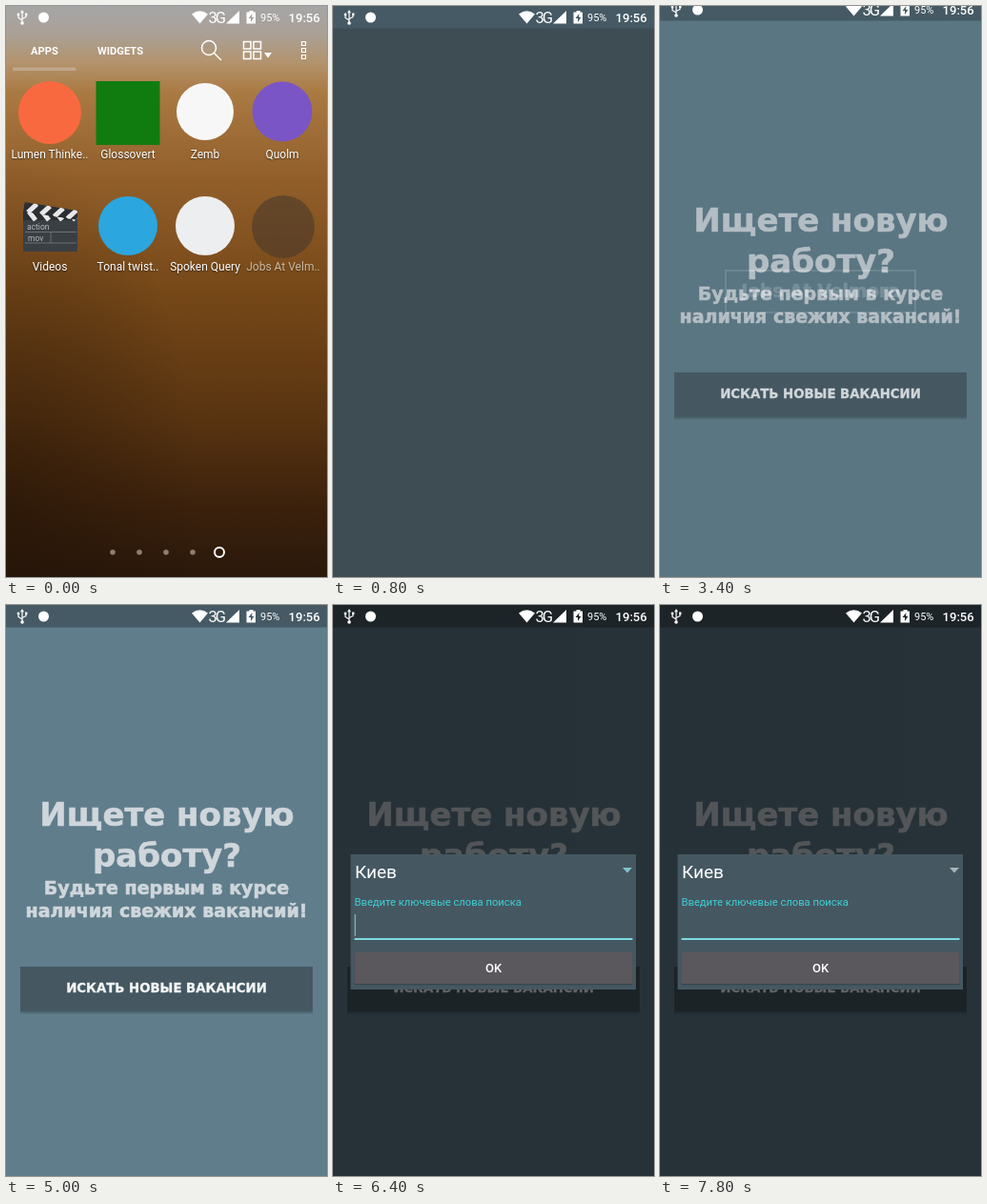
Animation, 337 px wide and 600 px high, one loop 8 s. Source, as an HTML page:

```html
<!DOCTYPE html>
<html lang="ru">
<head>
<meta charset="utf-8">
<title>Job search app</title>
<style>
  html, body { margin: 0; width: 100%; height: 100%; overflow: hidden; background: #455a64; }
  svg { display: block; width: 100vw; height: 100vh; font-family: Roboto, sans-serif; }

  /* Every state holds until the next one: hard steps on an 8 s loop. */
  .step { animation: 8s step-end infinite; }
  .mid { text-anchor: middle; }
  .bold { font-weight: 700; }
  .heavy { font-family: "DejaVu Sans", sans-serif; font-weight: 700; text-anchor: middle; stroke-width: .6; }
  .label text { font-size: 12px; fill: #fff; text-anchor: middle; text-shadow: 0 1px 2px #0009; }

  #launcher { animation-name: launcher; }
  @keyframes launcher { 0% { visibility: visible } 10%, 100% { visibility: hidden } }

  #pressed { animation-name: pressed; }
  @keyframes pressed { 0% { opacity: .6 } 2.5%, 100% { opacity: 1 } }

  #blank { animation-name: blank; }
  @keyframes blank {
    0% { opacity: 0; transform: none }
    5% { opacity: .85; transform: translateY(6px) }
    10% { opacity: 1; transform: none }
    12.5%, 100% { opacity: 0 }
  }

  #splash { animation-name: splash; }
  @keyframes splash { 0% { visibility: hidden } 12.5% { visibility: visible } 45%, 100% { visibility: hidden } }

  #logo { transform-origin: 168.5px 300px; animation-name: spin; }
  @keyframes spin {
    0% { opacity: 0 }
    15% { opacity: .4; transform: rotate(-108deg) scale(2.8) }
    17.5% { opacity: .75; transform: rotate(-43deg) scale(1.72) }
    20%, 100% { opacity: 1; transform: none }
  }

  #home { animation-name: home; }
  @keyframes home {
    0% { opacity: 0 }
    42.5% { opacity: .8; transform: translateY(5px) }
    45%, 100% { opacity: 1; transform: none }
  }

  #button { animation-name: button; }
  @keyframes button { 0% { fill: #455862 } 57.5% { fill: #485d68 } 62.5%, 100% { fill: #455862 } }

  #ripple { animation-name: ripple; }
  @keyframes ripple { 0% { opacity: 0 } 60% { opacity: .06 } 62.5%, 100% { opacity: 0 } }

  #dim { animation-name: dim; }
  @keyframes dim { 0% { opacity: 0 } 65%, 100% { opacity: .6 } }

  #dialog { animation-name: dialog; }
  @keyframes dialog { 0% { opacity: 0 } 65% { opacity: .6 } 70%, 100% { opacity: 1 } }

  #caret { animation-name: caret; }
  @keyframes caret {
    0% { opacity: 0 } 75% { opacity: 1 } 82.5% { opacity: 0 }
    92.5% { opacity: 1 } 97.5%, 100% { opacity: 0 }
  }

  #arrow { animation-name: arrow; }
  @keyframes arrow { 0% { fill: #a9b4b9 } 77.5% { fill: #7fc4cb } 82.5%, 100% { fill: #a9b4b9 } }

  #status { animation-name: status; }
  @keyframes status {
    0% { transform: none; visibility: visible }
    12.5% { visibility: hidden }
    42.5% { transform: translateY(-8px); visibility: visible }
    45%, 100% { transform: none; visibility: visible }
  }

  #bar { animation-name: bar; }
  @keyframes bar { 0% { fill: #455a6400 } 5% { fill: #455a64 } 65%, 100% { fill: #1c2428 } }
</style>
</head>
<body>
<svg viewBox="0 0 337 600" preserveAspectRatio="none">
  <defs>
    <linearGradient id="sand" x2="0" y2="1">
      <stop offset="0" stop-color="#a6a6a6"/>
      <stop offset=".05" stop-color="#aaa096"/>
      <stop offset=".1" stop-color="#b3936c"/>
      <stop offset=".15" stop-color="#aa7a43"/>
      <stop offset=".3" stop-color="#925f2a"/>
      <stop offset=".5" stop-color="#764818"/>
      <stop offset=".72" stop-color="#593411"/>
      <stop offset=".88" stop-color="#3b210c"/>
      <stop offset="1" stop-color="#2a180b"/>
    </linearGradient>
    <radialGradient id="shade" cx="0" cy=".85" r=".6">
      <stop offset="0" stop-color="#1d0f05" stop-opacity=".45"/>
      <stop offset="1" stop-color="#1d0f05" stop-opacity="0"/>
    </radialGradient>
    <clipPath id="clap"><path d="M18 206H75V216H18Z"/></clipPath>
  </defs>

  <g id="launcher" class="step">
    <path fill="url(#sand)" d="M0 0H337V600H0Z"/>
    <path fill="url(#shade)" d="M0 0H337V600H0Z"/>
    <path fill="#c4b09a" opacity=".75" d="M7 64.5H73V68H7Z"/>
    <g fill="#fff" font-size="11.2" class="bold">
      <text x="26" y="51">APPS</text>
      <text x="96" y="51">WIDGETS</text>
    </g>
    <g fill="none" stroke="#fff" stroke-width="1.5">
      <circle cx="213" cy="44" r="7.5"/>
      <path d="M218.500 49.500L226 57"/>
      <path d="M249.500 37.500h7.500v7.500h-7.500zM260 37.500h7.500v7.500h-7.500zM249.500 48h7.500v7.500h-7.500zM260 48h7.500v7.500h-7.500z"/>
      <path stroke-width="1.2" d="M310.500 37.500h4v4h-4zM310.500 44.500h4v4h-4zM310.500 51.500h4v4h-4z"/>
    </g>
    <path fill="#fff" d="M271 49h8l-4 5.500z"/>

    <circle cx="46" cy="112" r="33" fill="#f9693f"/>
    <path fill="#107c10" d="M94.500 79H161.500V146H94.500Z"/>
    <circle cx="209" cy="111" r="30" fill="#f7f7f7"/>
    <circle cx="290" cy="111" r="31.500" fill="#7a55c6"/>
    <circle cx="128" cy="231" r="31" fill="#2ba6de"/>
    <circle cx="209" cy="231" r="31" fill="#eceef0"/>

    <g>
      <path fill="#3a3f43" d="M18 225H75V258H18Z"/>
      <path fill="#2b2f32" d="M18 216H75V225H18Z"/>
      <path stroke="#e8e8e8" stroke-width="5" d="M24 216l7 9M38 216l7 9M52 216l7 9M66 216l7 9"/>
      <g transform="rotate(9 18 216)" clip-path="url(#clap)">
        <path fill="#2b2f32" d="M18 206H75V216H18Z"/>
        <path stroke="#e8e8e8" stroke-width="5" d="M31 206l-8 10M45 206l-8 10M59 206l-8 10M73 206l-8 10"/>
      </g>
      <path stroke="#777d80" stroke-width=".8" d="M20 237.500H74M20 249H74M47 238V249"/>
      <g fill="#b4b8ba" font-size="8.500">
        <text x="22" y="235">action</text>
        <text x="23" y="247">mov</text>
      </g>
    </g>

    <g class="label">
      <text x="46" y="160">Lumen Thinke..</text>
      <text x="128" y="160">Glossovert</text>
      <text x="209" y="160">Zemb</text>
      <text x="290" y="160">Quolm</text>
      <text x="46" y="278">Videos</text>
      <text x="128" y="278">Tonal twist..</text>
      <text x="209" y="278">Spoken Query</text>
      <g id="pressed" class="step">
        <circle cx="291" cy="232" r="33" fill="#4a3a2b"/>
        <text x="291" y="278">Jobs At Velm..</text>
      </g>
    </g>

    <g fill="#8d7f72">
      <circle cx="112" cy="574" r="2.800"/>
      <circle cx="140" cy="574" r="2.800"/>
      <circle cx="168" cy="574" r="2.800"/>
      <circle cx="196" cy="574" r="2.800"/>
    </g>
    <circle cx="224" cy="574" r="5" fill="none" stroke="#fff" stroke-width="2"/>
  </g>

  <path id="blank" class="step" fill="#3e4d53" d="M0 0H337V600H0Z"/>

  <g id="splash" class="step">
    <path fill="#455a64" d="M0 0H337V600H0Z"/>
    <g id="logo" class="step">
      <path fill="none" stroke="#bcc5c9" stroke-width="1.500" d="M69 278H268V322H69Z"/>
      <text class="heavy" x="168.500" y="306" font-size="18.600" fill="#cbd1d4" stroke="#cbd1d4">Jobs At Velmora</text>
    </g>
  </g>

  <g id="home" class="step">
    <path fill="#607d8b" d="M0 -6H337V600H0Z"/>
    <g class="heavy" fill="#cfd6dc" stroke="#cfd6dc">
      <g font-size="34">
        <text x="169" y="232">Ищете новую</text>
        <text x="169" y="275">работу?</text>
      </g>
      <g font-size="19">
        <text x="168.500" y="304">Будьте первым в курсе</text>
        <text x="168.500" y="328">наличия свежих вакансий!</text>
      </g>
    </g>
    <path fill="#000" opacity=".12" d="M15 382H322V429.500H15Z"/>
    <path fill="#000" opacity=".12" d="M15 382H322V428H15Z"/>
    <path id="button" class="step" d="M15 380H322V426.500H15Z"/>
    <circle id="ripple" class="step" cx="154.500" cy="399" r="12.500" fill="#fff"/>
    <text class="heavy" x="168.500" y="407" font-size="13.300" fill="#f4f6f7" stroke="#f4f6f7" style="stroke-width:.3">ИСКАТЬ НОВЫЕ ВАКАНСИИ</text>
  </g>

  <path id="dim" class="step" d="M0 0H337V600H0Z"/>

  <g id="dialog" class="step">
    <path fill="#455862" d="M18.500 262H318V404H18.500Z"/>
    <text x="23" y="286.500" font-size="19" fill="#fff">Киев</text>
    <path id="arrow" class="step" d="M304 276h10l-5 5.500z"/>
    <text x="22.500" y="316" font-size="11.230" fill="#3fd0d6">Введите ключевые слова поиска</text>
    <path id="caret" class="step" fill="#7fa6ae" d="M22.500 325h1.500v23h-1.500z"/>
    <path fill="#7ddbe0" d="M22.500 350H314.500V352H22.500Z"/>
    <path fill="#000" opacity=".18" d="M22.500 366H314.500V399.500H22.500Z"/>
    <rect x="22.500" y="365" width="292" height="33" rx="1.500" fill="#5a585d"/>
    <text class="mid" x="168.500" y="386" font-size="13" font-weight="500" fill="#fff">OK</text>
  </g>

  <g id="status" class="step" fill="#fff">
    <path id="bar" class="step" d="M0 0H337V23.500H0Z"/>
    <g fill="none" stroke="#fff" stroke-width="1.200">
      <path d="M17 6V18M17 15L13 12.500V9.500M17 13.500L21 11.500V9"/>
    </g>
    <path d="M17 4l2 3.200h-4zM20 7.500h2.400v2.400H20z"/>
    <circle cx="13" cy="9" r="1.400"/>
    <circle cx="17" cy="18" r="1.800"/>
    <circle cx="39.500" cy="12" r="5.500"/>
    <path d="M195 8.500Q203.500 2 212 8.500L203.500 18.500Z"/>
    <text x="212.500" y="18" font-size="16.500" letter-spacing="-2">3G</text>
    <path d="M231 18.500H245V5Z"/>
    <path fill-rule="evenodd" d="M252.500 6.500H255.500V5H259.500V6.500H262V18.500H252.500ZM258.500 8L254.500 13H257V17L260.500 11.800H258Z"/>
    <text x="267" y="16" font-size="11">95%</text>
    <text x="296.500" y="17" font-size="13.100" font-weight="500">19:56</text>
  </g>
</svg>
</body>
</html>
```
